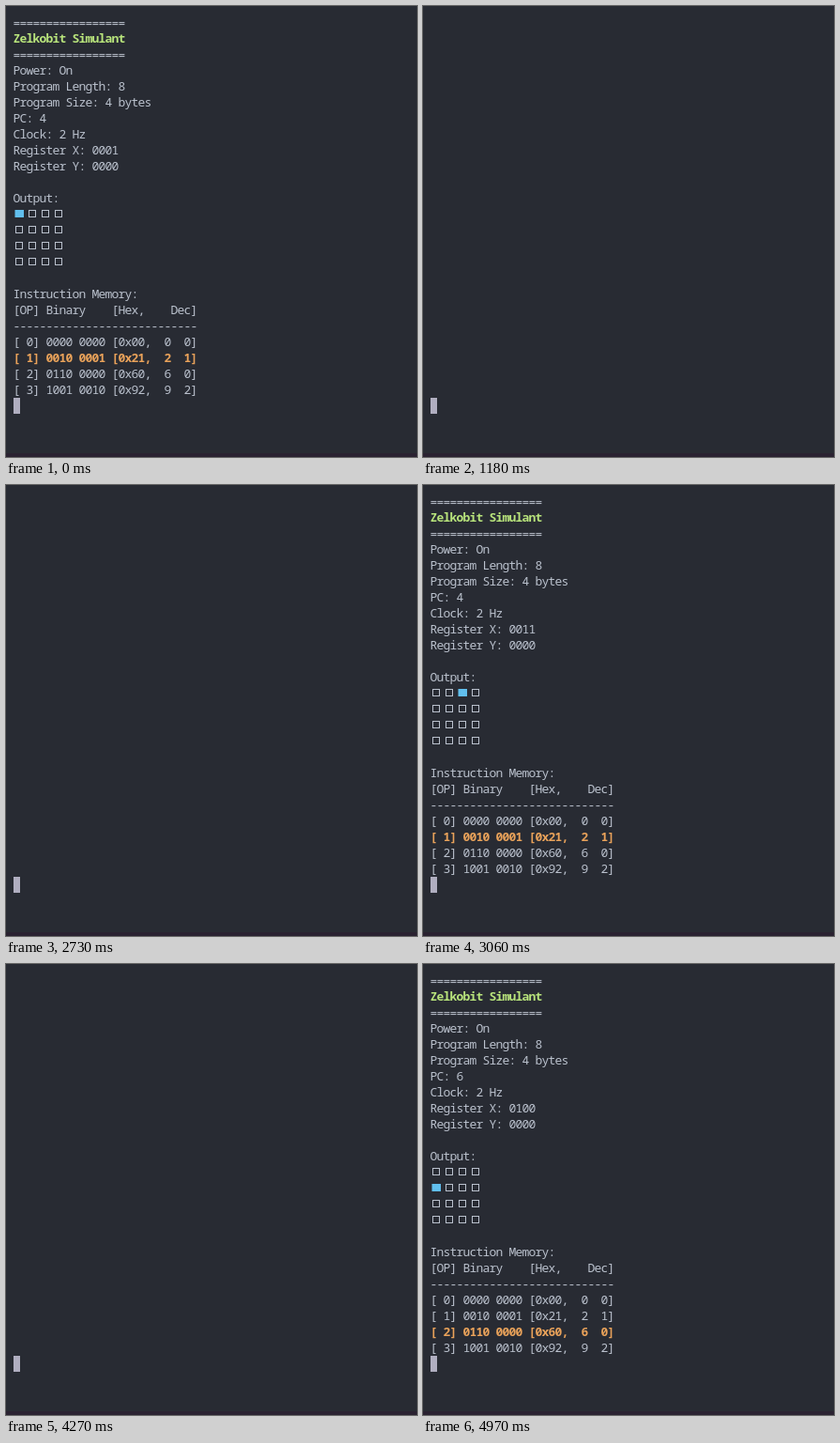
Animation of 438 by 480 pixels, one loop 5000 ms. Source, as an HTML page with a canvas:

```html
<!DOCTYPE html>
<html lang="en">
<head>
<meta charset="utf-8">
<title>4-bit CPU emulator</title>
<style>
  html, body { margin: 0; width: 100%; height: 100%; overflow: hidden; background: #282b33; }
  canvas { display: block; }
</style>
</head>
<body>
<canvas id="screen" width="438" height="480"></canvas>
<script>
const ctx = document.getElementById('screen').getContext('2d', { alpha: false });

const LOOP = 5000;
const CELL = 7, LINE = 17, LEFT = 8, TOP = 9;
const FONT = '13px "Noto Sans Mono", "DejaVu Sans Mono", monospace';
const COLOR = {
  back: '#282b33', edge: '#2a2231', text: '#bac1cd', title: '#b9e57c',
  active: '#e9a25a', pixel: '#61bfee', cursor: '#b0aec0'
};

// Start of each CPU step, and the moments the cleared terminal is visible
const STEPS = [150, 670, 1180, 1700, 2240, 2730, 3240, 3760, 4270, 4790];
const CLEARS = [1180, 2730, 4270, 4790];
const CLEAR_TIME = 30;

const PROGRAM = [0x00, 0x21, 0x60, 0x92];
const bin = n => n.toString(2).padStart(4, '0');
const hex = n => n.toString(16).padStart(2, '0');

function print(row, text, color = COLOR.text, weight = 500, baseline = 13) {
  ctx.font = `${weight} ${FONT}`;
  ctx.fillStyle = color;
  [...text].forEach((ch, i) => {
    if (ch !== ' ') ctx.fillText(ch, LEFT + (i + 0.5) * CELL, TOP + row * LINE + baseline);
  });
}

function stateAt(t) {
  const n = STEPS.filter(s => t >= s).length;
  return {
    pc: [4, 6, 2][n % 3],
    x: 1 + Math.floor(n / 3),
    out: Math.floor((n + 2) / 3)
  };
}

function drawOutput(lit) {
  for (let i = 0; i < 16; i++) {
    const x = LEFT + 2 + (i % 4) * 2 * CELL;
    const y = TOP + (12 + Math.floor(i / 4)) * LINE + 4;
    if (i === lit) {
      ctx.fillStyle = COLOR.pixel;
      ctx.fillRect(x - 0.5, y, 9.5, 8);
    } else {
      ctx.strokeStyle = COLOR.text;
      ctx.strokeRect(x + 0.5, y + 0.5, 7, 7);
    }
  }
}

function drawProgram(active) {
  PROGRAM.forEach((byte, i) => {
    const op = byte >> 4, arg = byte & 15;
    const line = `[ ${i}] ${bin(op)} ${bin(arg)} [0x${hex(byte)},  ${op}  ${arg}]`;
    if (i === active) print(20 + i, line, COLOR.active, 700);
    else print(20 + i, line);
  });
}

function drawRule(row) {
  print(row, '='.repeat(17), COLOR.text, 500, 14);
}

function drawScreen({ pc, x, out }) {
  drawRule(0);
  print(1, 'Zelkobit Simulant', COLOR.title, 700);
  drawRule(2);
  [
    'Power: On',
    'Program Length: 8',
    'Program Size: 4 bytes',
    `PC: ${pc}`,
    'Clock: 2 Hz',
    `Register X: ${bin(x)}`,
    `Register Y: ${bin(0)}`
  ].forEach((line, i) => print(3 + i, line));
  print(11, 'Output:');
  drawOutput(out);
  print(17, 'Instruction Memory:');
  print(18, '[OP] Binary    [Hex,    Dec]');
  print(19, '-'.repeat(28));
  drawProgram(pc / 2 - 1);
}

function frame() {
  const t = performance.now() % LOOP;
  ctx.textAlign = 'center';
  ctx.fillStyle = COLOR.back;
  ctx.fillRect(0, 0, 438, 480);
  ctx.fillStyle = COLOR.edge;
  ctx.fillRect(0, 476, 438, 4);
  ctx.fillStyle = COLOR.cursor;
  ctx.fillRect(LEFT, TOP + 24 * LINE, CELL, LINE);
  if (!CLEARS.some(c => t >= c && t < c + CLEAR_TIME)) drawScreen(stateAt(t));
  requestAnimationFrame(frame);
}
frame();
</script>
</body>
</html>
```
